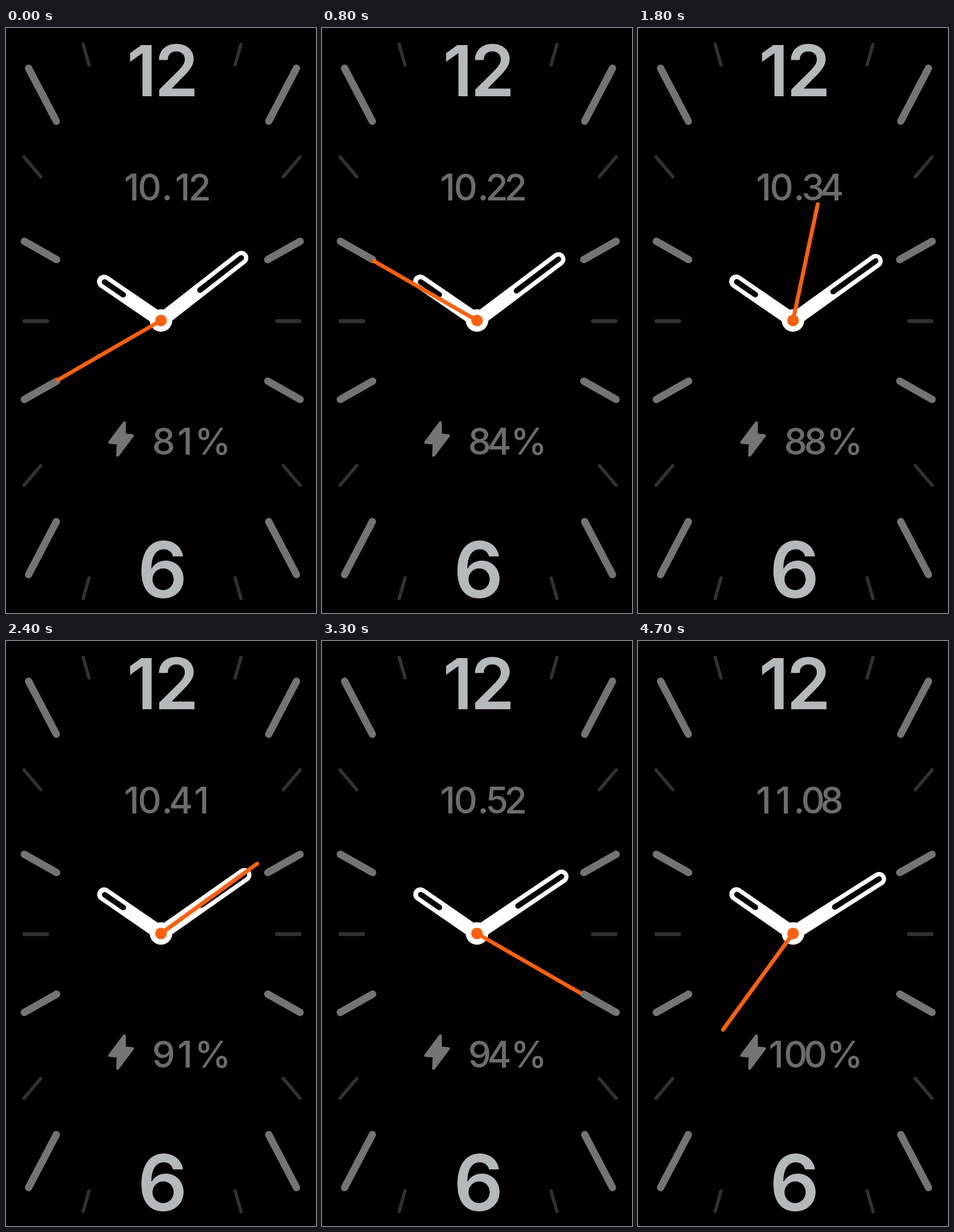
These frames come from a looping animation (508 by 960 pixels, 5000 ms). An HTML page with a canvas:

```html
<!DOCTYPE html>
<html lang="en">
<head>
<meta charset="utf-8">
<title>Watch face</title>
<style>
html, body { margin: 0; width: 100%; height: 100%; overflow: hidden; background: #000; }
canvas { display: block; width: 508px; height: 960px; }
</style>
</head>
<body>
<canvas id="face" width="508" height="960" role="img" aria-label="Watch face with time and charge level"></canvas>
<script>
const ctx = document.getElementById('face').getContext('2d');
const LOOP = 5000, STEP = 100, LAST = 47;
const CX = 254, CY = 480;
const GREY = '#737575', DIM = '#303131', PALE = '#b4b9ba', TEXT = '#6b6d6d', ORANGE = '#ff600d';

function line(x1, y1, x2, y2, width, color) {
  ctx.strokeStyle = color;
  ctx.lineWidth = width;
  ctx.lineCap = 'round';
  ctx.beginPath();
  ctx.moveTo(x1, y1);
  ctx.lineTo(x2, y2);
  ctx.stroke();
}

function dot(radius, color) {
  ctx.fillStyle = color;
  ctx.beginPath();
  ctx.arc(CX, CY, radius, 0, Math.PI * 2);
  ctx.fill();
}

// One tick repeated in all four corners
function ticks(x1, y1, x2, y2, width, color, sumX, sumY) {
  for (const fx of [x => x, x => sumX - x]) {
    for (const fy of [y => y, y => sumY - y]) {
      line(fx(x1), fy(y1), fx(x2), fy(y2), width, color);
    }
  }
}

function setFont(weight, size, color) {
  ctx.font = `${weight} ${size}px Inter, Roboto, sans-serif`;
  ctx.textAlign = 'left';
  ctx.textBaseline = 'alphabetic';
  ctx.fillStyle = color;
}

// Centres the visible part of a character on x
function glyph(ch, x, base) {
  const m = ctx.measureText(ch);
  ctx.fillText(ch, x + (m.actualBoundingBoxLeft - m.actualBoundingBoxRight) / 2, base);
}

function cells(text, centers, base) {
  [...text].forEach((ch, i) => glyph(ch, centers[i] + (ch === '1' ? 1.5 : 0), base));
}

function hand(deg, from, to, width, color) {
  const a = deg * Math.PI / 180, s = Math.sin(a), c = Math.cos(a);
  line(CX + s * from, CY - c * from, CX + s * to, CY - c * to, width, color);
}

function bolt() {
  const pts = [[194, 648], [170, 680], [184, 681], [183, 701], [207, 669], [194, 668]];
  ctx.beginPath();
  pts.forEach(([x, y]) => ctx.lineTo(x, y));
  ctx.closePath();
  ctx.lineJoin = 'round';
  ctx.lineWidth = 5;
  ctx.strokeStyle = ctx.fillStyle = GREY;
  ctx.fill();
  ctx.stroke();
}

function dial() {
  ctx.fillStyle = '#000';
  ctx.fillRect(0, 0, 508, 960);
  ticks(126.5, 27, 136, 60.5, 5.5, DIM, 511.5, 963);
  ticks(29.5, 211.5, 57, 244, 5.5, DIM, 511.5, 962);
  line(30, 481, 67.5, 481, 6.5, DIM);
  line(444, 481, 481, 481, 6.5, DIM);
  ticks(37, 66, 82.5, 153, 12, GREY, 513, 963);
  ticks(30, 350, 83, 380, 12, GREY, 512, 959.5);
  setFont(600, 116, PALE);
  glyph('1', 221, 112);
  glyph('2', 280, 112);
  setFont(600, 128, PALE);
  glyph('6', 256.5, 934.5);
}

function draw(time) {
  const step = Math.min(Math.floor(time / STEP), LAST);
  const count = Math.round(step * 1.2);
  const charge = 81 + Math.round(step * 0.4);
  const mins = 10 * 60 + 12 + count;
  const clock = `${Math.floor(mins / 60)}.${String(mins % 60).padStart(2, '0')}`;

  dial();
  setFont(500, 60, TEXT);
  cells(clock, [203.5, 235.5, 264, 287, 318], 283);
  cells(String(charge).padStart(3), [224, 258.5, 291], 699.5);
  glyph('%', 339, 699.5);
  bolt();

  const hour = 304.35 + count / 120, minute = 52 + count / 10;
  hand(hour, 0, 113, 23, '#fff');
  hand(minute, 0, 167, 23, '#fff');
  hand(hour, 75, 112, 9, '#000');
  hand(minute, 81, 167, 9, '#000');
  dot(18.5, '#fff');
  hand(240 + count * 6, 0, 195, 6.5, ORANGE);
  dot(9.5, ORANGE);
}

const start = performance.now();
function tick() {
  draw((performance.now() - start) % LOOP);
  requestAnimationFrame(tick);
}
tick();
</script>
</body>
</html>
```
